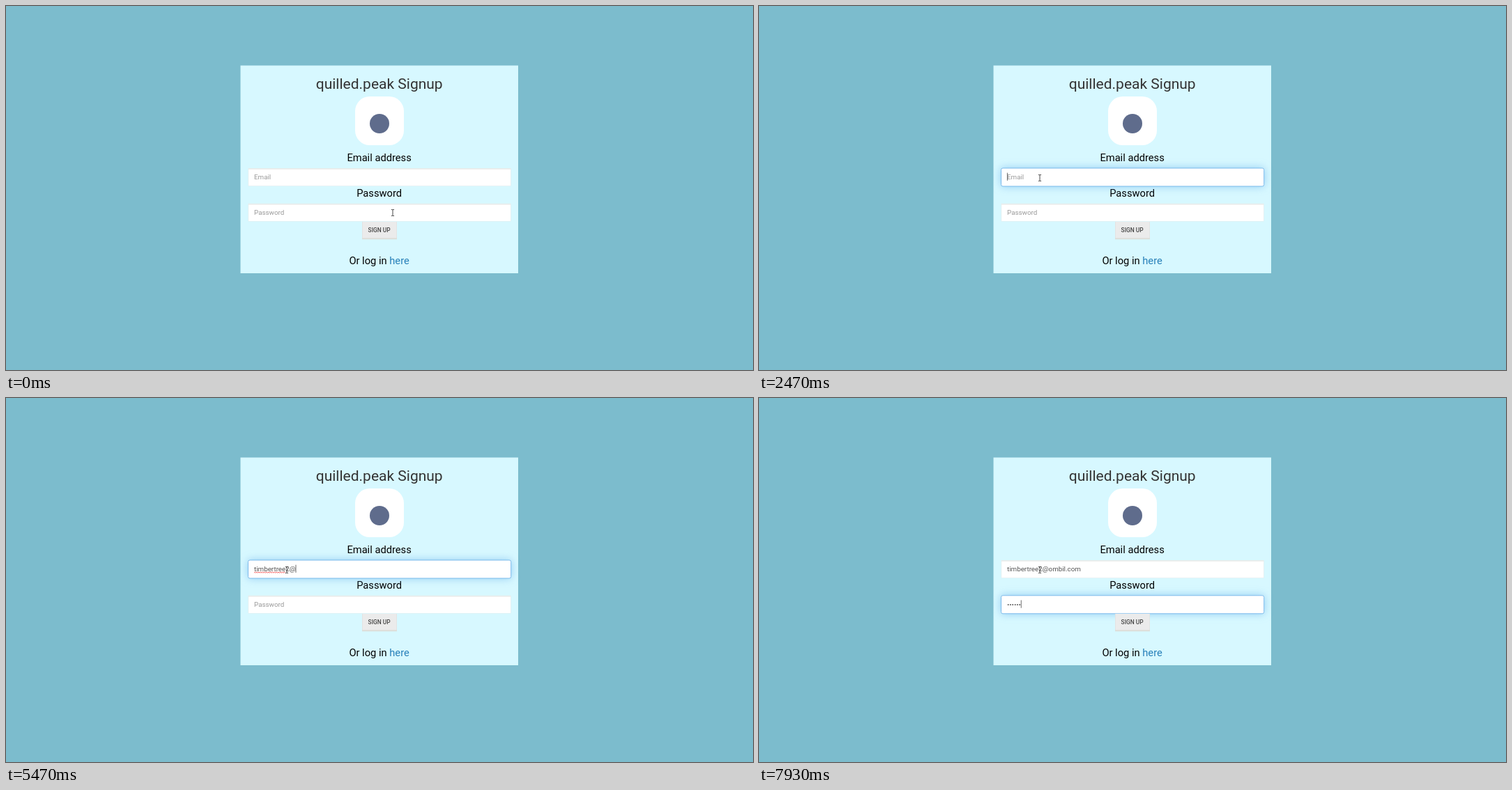
An HTML page that plays this animation: 1072x523 px, repeating every 8 s.

```html
<!DOCTYPE html>
<html lang="en">
<head>
<meta charset="utf-8">
<title>Signup</title>
<style>
  html, body { margin: 0; width: 100%; height: 100%; overflow: hidden; background: #7cbccd; }
  svg { display: block; font: 9.8px Roboto, sans-serif; }
  .mid { text-anchor: middle; }
  .label { font-size: 14.7px; }
  .focus { fill: #fff; stroke: #66afe9; stroke-width: .8; filter: drop-shadow(0 0 5.6px rgba(102, 175, 233, .6)); }
  .value { fill: #555; }
  .hint { fill: #999; }
</style>
</head>
<body>
<svg width="1072" height="523" viewBox="0 0 1072 523">
  <rect x="336.5" y="85.5" width="398.5" height="298.5" fill="#d7f8ff"/>
  <text class="mid" x="535.7" y="118.8" font-size="21" fill="#333">quilled.peak Signup</text>
  <rect x="501" y="130" width="70" height="70" rx="21" fill="#fff"/>
  <circle cx="536" cy="169" r="14" fill="#5f6c8c"/>
  <text class="mid label" x="535.6" y="223.4">Email address</text>
  <text class="mid label" x="535.6" y="274.4">Password</text>
  <g id="fields"></g>
  <rect x="511" y="310" width="50" height="25.3" fill="#dcdcd8"/>
  <rect x="511.5" y="310" width="49" height="23.3" fill="#ebebeb"/>
  <text class="mid" x="535.6" y="325" font-size="8.4" font-weight="500" fill="#444">SIGN UP</text>
  <text class="mid label" x="535.6" y="371.4">Or log in <tspan fill="#2780b9">here</tspan></text>
  <path id="squiggle" fill="none" stroke="#e33" stroke-width=".8"/>
  <path id="caret" d="M0 -9.4v11.2" stroke="#444" stroke-width=".8"/>
  <path id="pointer" d="M-2 -4.5h1.4l.6 .5l.6 -.5h1.4M0 -4v8M-2 4.5h1.4l.6 -.5l.6 .5h1.4" fill="none" stroke="#333" stroke-width=".9"/>
</svg>
<script>
const LOOP = 8000, FPS = 15, LEFT = 356;
const EMAIL = "timbertree2@ombil.com", WORD = 10;
const CLICK = 1470, TAB = 6930;
const emailKeys = [2800, 2930, 3070, 3200, 3330, 3600, 3930, 4470, 4600, 4800, 5130,
  5400, 5730, 5870, 6000, 6130, 6270, 6400, 6600, 6700, 6800];
const passwordKeys = [7330, 7470, 7600, 7730, 7870, 7930];
const $ = id => document.getElementById(id);
const clamp = v => Math.min(1, Math.max(0, v));
const ease = (t, from, to) => { const p = clamp((t - from) / (to - from)); return p * p * (3 - 2 * p); };

function makeField(top, hint) {
  const group = document.createElementNS("http://www.w3.org/2000/svg", "g");
  group.setAttribute("transform", `translate(0 ${top})`);
  group.innerHTML = `<rect x="347.6" y="0" width="377" height="25.6" fill="#e8eceb"/>
    <rect x="348.2" y="1.8" width="375.9" height="23.4" fill="#fff"/>
    <rect class="focus" x="347.5" y="0" width="377.2" height="26" rx="2.4"/>
    <text x="${LEFT}" y="16.1"></text>`;
  $("fields").append(group);
  const text = group.querySelector("text"), ring = group.querySelector(".focus");
  return {
    text,
    baseline: top + 16.1,
    show(value, focus) {
      text.textContent = value || hint;
      text.setAttribute("class", value ? "value" : "hint");
      ring.style.opacity = focus;
    }
  };
}

const email = makeField(233, "Email");
const password = makeField(283.8, "Password");

function place(el, x, y) { el.setAttribute("transform", `translate(${x} ${y})`); }

function drawCaret(t, field, value, keys, start) {
  const last = Math.max(start, ...keys.filter(k => k <= t));
  const width = value ? field.text.getSubStringLength(0, value.length) : 0;
  $("caret").style.display = t >= start && (t - last) % 1000 < 500 ? "" : "none";
  place($("caret"), LEFT + width + .4, field.baseline);
}

function draw(t) {
  const typed = keys => keys.filter(k => k <= t).length;
  const address = EMAIL.slice(0, typed(emailKeys));
  const secret = "•".repeat(typed(passwordKeys));
  const entered = clamp((t - CLICK) / 150), left = clamp((t - TAB) / 150);
  email.show(address, entered * (1 - left));
  password.show(secret, left);

  if (t < TAB) drawCaret(t, email, address, emailKeys, CLICK);
  else drawCaret(t, password, secret, passwordKeys, TAB);

  let wave = "";
  if (address.includes("@") && t < TAB) {
    const steps = Math.round(email.text.getSubStringLength(0, WORD) / 2.8);
    wave = `M${LEFT} 251.2` + "l1.4 -1.1l1.4 1.1".repeat(steps);
  }
  $("squiggle").setAttribute("d", wave);

  const glide = ease(t, 60, 800), nudge = ease(t, 1200, 1450);
  place($("pointer"), 555 - 162.3 * glide + 10.3 * nudge, 297 - 53 * glide + 3 * nudge);
}

const origin = performance.now();
function tick() {
  const t = (performance.now() - origin) % LOOP;
  draw(Math.round(Math.floor((t + 5) * FPS / 1000) * 100 / FPS) * 10);
  requestAnimationFrame(tick);
}
tick();
</script>
</body>
</html>
```
